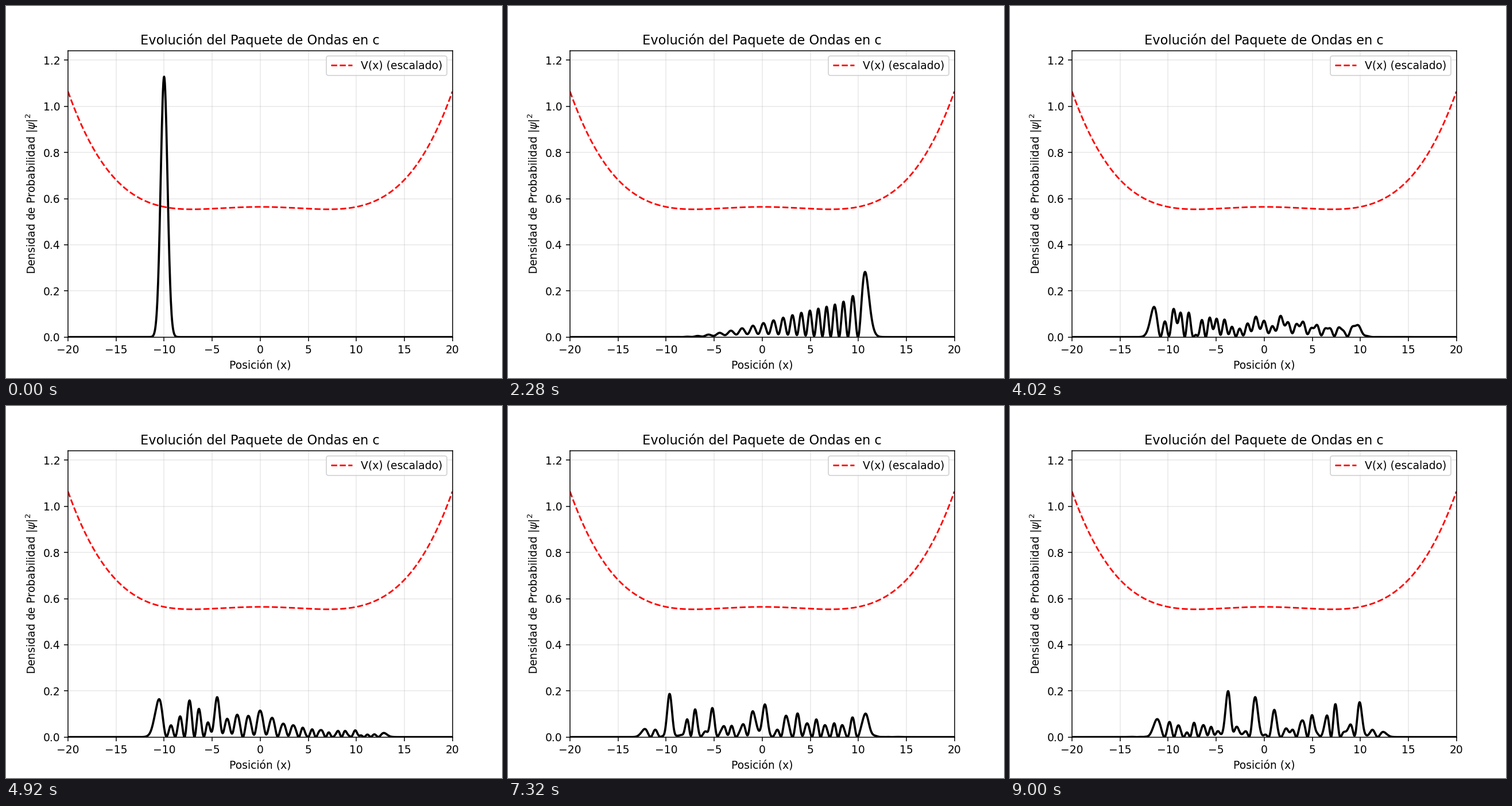
A matplotlib script for the animation above (9030 ms loop, 864x648 px).

```python
import numpy as np
import matplotlib.pyplot as plt
from matplotlib.animation import FuncAnimation

# Grid and time (hbar = m = 1)
N, L = 1024, 20.0
FRAMES, DT, SUB = 301, 0.1, 20

x = np.linspace(-L, L, N, endpoint=False)
k = 2 * np.pi * np.fft.fftfreq(N, d=2 * L / N)


def potential(x):
    return 0.001 * x**4 - 0.1 * x**2


def initial_packet(x, x0=-10.0, sigma=0.5, k0=2.0):
    norm = (np.pi * sigma**2) ** -0.25
    return norm * np.exp(-(x - x0) ** 2 / (2 * sigma**2) + 1j * k0 * x)


def evolve(psi):
    """Split-step Fourier evolution; one density row per frame."""
    h = DT / SUB
    half_v = np.exp(-0.5j * h * potential(x))
    kinetic = np.exp(-0.5j * h * k**2)
    rows = [np.abs(psi) ** 2]
    for _ in range(FRAMES - 1):
        for _ in range(SUB):
            psi = half_v * np.fft.ifft(kinetic * np.fft.fft(half_v * psi))
        rows.append(np.abs(psi) ** 2)
    return np.array(rows)


density = evolve(initial_packet(x))
peak = density[0].max()

plt.rcParams["font.family"] = "DejaVu Sans"
fig, ax = plt.subplots(figsize=(6.4, 4.8), dpi=135)

xv = np.linspace(-L, L, 1000)
v = potential(xv)
ax.plot(xv, 0.5 * v / v.max() + 0.5 * peak, "r--", label="V(x) (escalado)")
line, = ax.plot(x, density[0], color="black", lw=2)

ax.set_xlim(-L, L)
ax.set_ylim(0, 1.1 * peak)
ax.set_title("Evolución del Paquete de Ondas en c")
ax.set_xlabel("Posición (x)")
ax.set_ylabel(r"Densidad de Probabilidad $|\psi|^2$")
ax.grid(alpha=0.3)
ax.legend(loc="upper right")


def update(i):
    line.set_ydata(density[i])
    return line,


anim = FuncAnimation(fig, update, frames=FRAMES, interval=30,
                     repeat=True, repeat_delay=0)
plt.show()
```
